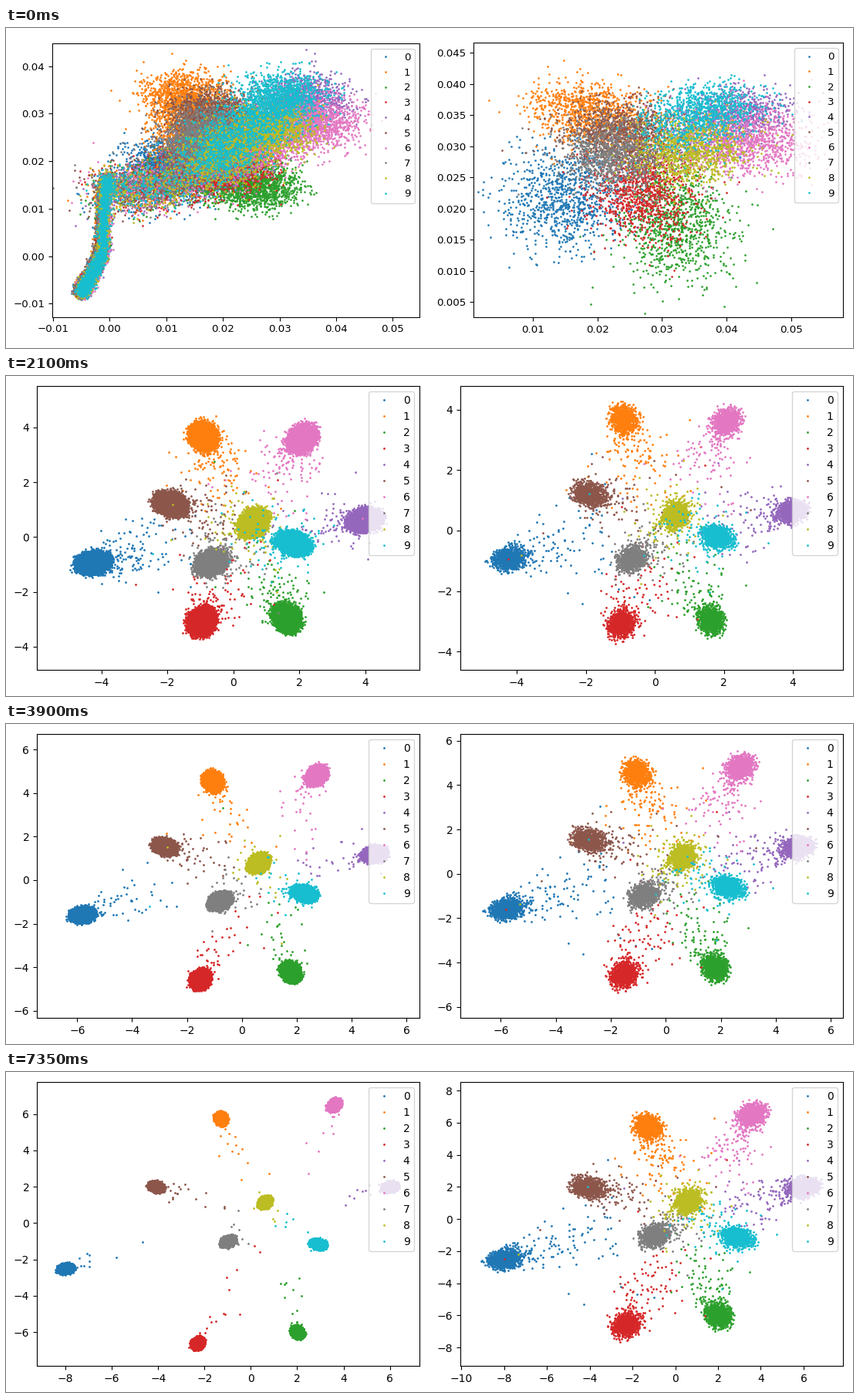
These frames come from a looping animation (1098x416 px, 7500 ms). A matplotlib script:

```python
import numpy as np
import matplotlib.pyplot as plt
from matplotlib.animation import FuncAnimation

W, H, DPI = 1098, 416, 100
PANEL = W / 2
AX_W, AX_H = 496, 369.6
EPOCHS, STEP = 50, 150
SETTLED = 8  # epoch at which the classes have separated

plt.rcParams.update({"font.family": "DejaVu Sans", "font.size": 10})

# Key poses: the centres of classes 0..9 untrained, separated and at the end.
START = np.array([(1.3, 2.1), (1.7, 3.7), (3.3, 1.6), (2.7, 2.2), (4.3, 3.6),
                  (2.3, 3.3), (4.6, 3.1), (2.2, 2.9), (3.6, 3), (3.8, 3.7)]) / 100
FIRST = np.array([(-3.2, -.5), (-.8, 3.1), (1.5, -2.1), (-.6, -2.1), (3.4, .25),
                  (-1.3, 1), (1.65, 2.8), (-.6, -.9), (.6, .35), (1.5, .05)])
LAST = np.array([(-8, -2.5), (-1.3, 5.75), (2, -6), (-2.3, -6.6), (6, 2),
                 (-4.1, 2), (3.6, 6.5), (-1, -1), (.6, 1.15), (2.9, -1.15)])

# Room around the outermost centres (left, right, bottom, top), first and last.
ROOM = (np.array([(1.38, 1.33, 1.23, 1.1), (1.24, 1.28, 1.26, 1.28)]),
        np.array([(1.2, 1.38, 1.24, .85), (2.04, 1.84, 2.55, 2.05)]))
START_VIEW = ((-.0102, .0548, -.0128, .0448), (.0008, .0581, .0025, .0466))


def mix(a, b, t):
    return a + (b - a) * t


def progress(epoch):
    """Growth up to separation, then time from separation to the end."""
    u, u0, u1 = np.sqrt([epoch, SETTLED, EPOCHS - 1])
    return min(u / u0, 1), (u - u0) / (u1 - u0)


def centres(epoch):
    grow, t = progress(epoch)
    return mix(FIRST, LAST, max(t, 0)) * grow


def view(epoch, side):
    if epoch == 0:
        return START_VIEW[side]
    grow, t = progress(epoch)
    t = max(t, 0)
    room = mix(*ROOM[side], t)
    if side == 0:
        room = room + np.array([.4, .4, .6, .8]) * np.sin(np.pi * t ** .7)
    room = room * mix(.5, 1, grow)
    mid = centres(epoch)
    (x0, y0), (x1, y1) = mid.min(axis=0), mid.max(axis=0)
    return np.array([x0, x1, y0, y1]) + room * [-1, 1, -1, 1]


class Cloud:
    """Fixed random traits of all points in one panel."""

    def __init__(self, count, seed):
        rng = np.random.default_rng(seed)
        size = (10, count)
        self.raw = rng.normal(size=size + (2,))
        # Classes are longer along the ray from the middle than across it.
        r = np.linalg.norm(self.raw, axis=2, keepdims=True)
        along, across = np.moveaxis(self.raw * 3.4 * np.tanh(r / 3.4) / r, 2, 0)
        ray = LAST / np.linalg.norm(LAST, axis=1, keepdims=True)
        side = np.stack([-ray[:, 1], ray[:, 0]], axis=1)
        self.core = (.29 * along[..., None] * ray[:, None]
                     + .22 * across[..., None] * side[:, None])
        self.drift = rng.normal(size=size + (2,))
        self.rank, self.odd, self.way = rng.random((3,) + size)
        self.other = rng.integers(0, 10, size)


def untrained(cloud, side):
    mid = START[:, None]
    if side == 1:
        sy = .0067 - .13 * mid[..., 1]
        sigma = np.stack([np.full_like(sy, .0042), sy], axis=2)
        pull = .6 * cloud.way[..., None] ** 2.5
        return mix(mid, np.array([.028, .027]), pull) + sigma * cloud.raw
    # The first pass: up a narrow trunk, then fanning out by class.
    p = cloud.rank
    knots = [0, .2, .32, .44, .45, .5]
    x = np.interp(p, knots, [-.005, -.0038, -.0015, -.0008, .001, .012])
    y = np.interp(p, knots, [-.0075, -.005, .0005, .0165, .0138, .0155])
    trunk = np.stack([x, y], axis=2)
    w = np.clip((p - .5) / .35, 0, 1)[..., None]
    noise = np.where(p[..., None] < .45, [.0005, .0006], [.0036, .0026])
    lean = (mid - [.03, .028]) * [.02, .01]
    fan = mid * [.8, .92] - [.0165, .0185]
    shift = np.where(w > 0, [.0045, .003], 0)
    return trunk + shift + w * fan + noise * cloud.raw + lean


def trained(cloud, epoch, side):
    t = progress(epoch)[1]
    if side == 0:
        scale, tail, stray = 1 - .42 * t, .1 * np.exp(-3 * t), .004 * np.exp(-4 * t)
    else:
        scale, tail, stray = .72 + .7 * t, .22, .008
    mid = centres(epoch)
    hub = np.array([.1, .04]) * np.sqrt(epoch)
    far = np.clip(1 - cloud.rank / tail, 0, 1)[..., None]
    depth = .6 * far ** 3
    pos = mix(mid[:, None], hub, depth) + scale * cloud.core
    pos = pos + cloud.drift * (.35 * scale * far + .8 * depth)
    lost = (cloud.way * (cloud.odd < stray))[..., None]
    return mix(pos, mid[cloud.other], lost)


def set_scale(ax, side, s):
    left = PANEL * (side + 1) - s * (AX_W + 13)
    bottom = H / 2 + s * (33.8 - H / 2)
    ax.set_position([left / W, bottom / H, s * AX_W / W, s * AX_H / H])
    ax.tick_params(labelsize=10 * s, length=3.5 * s, pad=3.5 * s, width=.8 * s)
    for spine in ax.spines.values():
        spine.set_linewidth(.8 * s)


def draw_panel(ax, side, epoch):
    ax.clear()
    cloud = CLOUDS[side]
    pos = trained(cloud, epoch, side) if epoch else untrained(cloud, side)
    lines = [ax.plot(*pts.T, ".", color=f"C{i}", ms=2, label=str(i))[0]
             for i, pts in enumerate(pos)]
    x0, x1, y0, y1 = view(epoch, side)
    ax.set(xlim=(x0, x1), ylim=(y0, y1))

    # Wide tick labels shrink the whole panel to its fixed width.
    set_scale(ax, side, 1)
    labels = ax.yaxis.get_tightbbox(fig.canvas.get_renderer()).width
    s = PANEL / max(PANEL, AX_W + 32.5 + labels)
    set_scale(ax, side, s)
    for line in lines:
        line.set(markersize=2 * s, markeredgewidth=s)
    ax.legend(loc="upper right", fontsize=10 * s)


def draw(epoch):
    for side, ax in enumerate(axes):
        draw_panel(ax, side, epoch)
    return []


CLOUDS = Cloud(5000, 3), Cloud(1000, 8)
fig = plt.figure(figsize=(W / DPI, H / DPI), dpi=DPI, facecolor="white")
axes = [fig.add_axes([.04 + .5 * i, .08, .45, .88]) for i in range(2)]
anim = FuncAnimation(fig, draw, frames=EPOCHS, interval=STEP,
                     init_func=lambda: [], repeat=True, repeat_delay=0,
                     blit=False)
plt.show()
```
